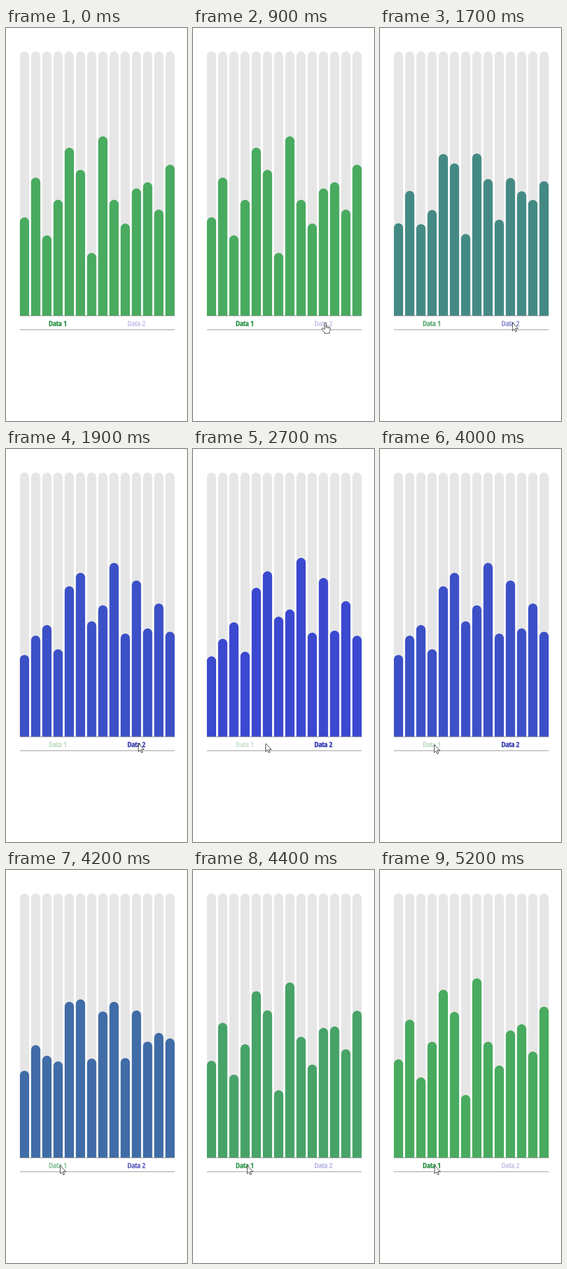
Animation of 352 by 762 pixels, one loop 5300 ms. Source, as an HTML page:

```html
<!DOCTYPE html>
<html lang="en">
<head>
<meta charset="utf-8">
<title>Bar chart toggle</title>
<style>
  html, body { margin: 0; width: 100%; height: 100%; overflow: hidden; background: #fff; }
  svg { display: block; width: 352px; height: 762px; }
  text {
    font: 300 15px "Open Sans Condensed", "Open Sans Condensed Light", "Open Sans", "Noto Sans", sans-serif;
    font-stretch: condensed;
    letter-spacing: -.5px;
    text-anchor: middle;
    stroke-width: .35px;
  }
  .cursor { fill: #fff; stroke: #222; stroke-width: 1; stroke-linejoin: round; stroke-linecap: round; }
</style>
</head>
<body>
<svg viewBox="0 0 352 762">
  <g id="tracks" fill="#e6e6e6"></g>
  <g id="bars"></g>
  <path d="M27 558H328M27 585H328" stroke="#808080" stroke-width="1"/>
  <text id="label1" x="100.5" y="577.5">Data 1</text>
  <text id="label2" x="253.5" y="577.5">Data 2</text>
  <g id="arrow" class="cursor">
    <path d="M.5 .5V16L4 12.6L6.5 18L8.8 17L6.4 11.7H11.2Z"/>
  </g>
  <g id="hand" class="cursor">
    <path d="M-1.5 13.5V2Q-1.5 .5 0 .5T1.5 2V8Q1.8 6.9 3 7T4.5 8.5Q5 7.6 6.2 7.9T7.3 9.5Q8 8.8 9 9.3T9.7 11V14.5Q9.7 16.5 8.2 18.5V21H-1.5V19.5Q-4.6 16.2 -6.4 13Q-7 11.5 -5.8 10.8T-3.6 11.4Z"/>
    <path d="M1.5 8V11M4.5 8.7V11M7.3 9.7V11.5" fill="none"/>
  </g>
</svg>
<script>
const LOOP = 5300, BASE = 558, TRACK_TOP = 45.5;
const WIDTH = 18, PITCH = 283 / 13;
const DATA1 = [367, 290, 402, 333, 232, 275, 436, 210, 333, 379, 311, 299, 352, 265];
const DATA2 = [402, 368, 336, 393, 269, 237, 325, 311, 211, 356, 250, 352, 295, 362];
const GREEN = [72, 171, 95], BLUE = [59, 72, 208];

// [time, share of the second data set]
const BLEND = [
  [0, 0], [1600, .08], [1700, .33], [1800, .67], [1900, .92], [2000, 1],
  [3900, .98], [4000, .92], [4100, .81], [4200, .635], [4300, .33], [4400, .08], [4500, 0]
];
// [time, shape, x, y]
const CURSOR = [
  [0, ""], [800, "hand", 261, 573], [900, "hand", 257, 571], [1400, "arrow", 257, 571],
  [2400, "arrow", 251, 571], [2500, "arrow", 225, 571], [2600, "arrow", 180, 571],
  [2700, "arrow", 141, 571], [2800, "arrow", 124, 572], [2900, "arrow", 118, 572],
  [3000, "hand", 108, 573], [3100, "hand", 105, 573], [3800, "arrow", 105, 573],
  [4800, "arrow", 106, 573]
];

const $ = id => document.getElementById(id);
const mix = (a, b, p) => a + (b - a) * p;
const mixColor = (a, b, p) => `rgb(${a.map((v, i) => Math.round(mix(v, b[i], p)))})`;
const stepAt = (steps, t) => steps.findLast(s => s[0] <= t);

function barPath(i, top) {
  const x = 27 + i * PITCH, r = WIDTH / 2;
  return `M${x} ${BASE}V${top + r}a${r} ${r} 0 0 1 ${WIDTH} 0V${BASE}Z`;
}

function addPath(group, d) {
  const path = document.createElementNS("http://www.w3.org/2000/svg", "path");
  path.setAttribute("d", d);
  return group.appendChild(path);
}

const bars = DATA1.map((top, i) => {
  addPath($("tracks"), barPath(i, TRACK_TOP));
  return addPath($("bars"), barPath(i, top));
});

function paintLabel(id, color) {
  $(id).setAttribute("fill", color);
  $(id).setAttribute("stroke", color);
}

function draw(t) {
  const p = stepAt(BLEND, t)[1];
  bars.forEach((bar, i) => bar.setAttribute("d", barPath(i, mix(DATA1[i], DATA2[i], p))));
  $("bars").setAttribute("fill", mixColor(GREEN, BLUE, p));
  paintLabel("label1", mixColor([50, 150, 76], [208, 230, 215], p));
  paintLabel("label2", mixColor([206, 204, 236], [48, 56, 172], p));

  const [, shape, x, y] = stepAt(CURSOR, t);
  for (const id of ["arrow", "hand"]) {
    $(id).style.display = id === shape ? "" : "none";
    if (id === shape) $(id).setAttribute("transform", `translate(${x} ${y})`);
  }
}

const start = performance.now();
function tick(now) {
  draw(Math.max(0, now - start) % LOOP);
  requestAnimationFrame(tick);
}
draw(0);
requestAnimationFrame(tick);
</script>
</body>
</html>
```
